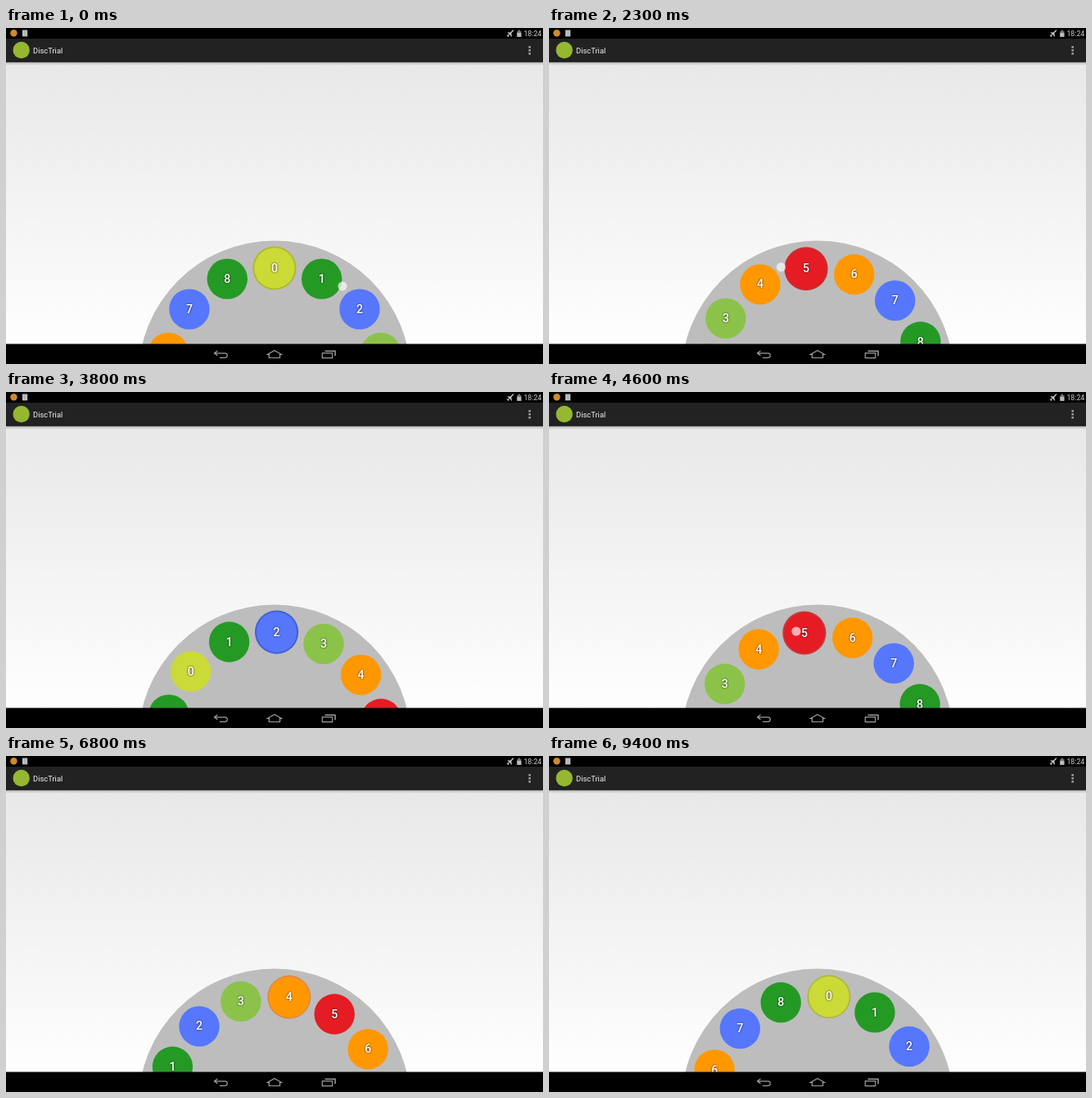
These frames come from a looping animation (656 by 410 pixels, 9500 ms). An HTML page:

```html
<!DOCTYPE html>
<html lang="en">
<head>
<meta charset="utf-8">
<title>Wheel</title>
<style>
  html, body { margin: 0; width: 100%; height: 100%; overflow: hidden; background: #000; }
  svg { display: block; width: 656px; height: 410px; font-family: Roboto, sans-serif; }
  .label { fill: #fff; font-size: 14.2px; font-weight: 500; text-anchor: middle;
           filter: drop-shadow(.6px .8px .9px rgba(0, 0, 0, .85)); }
</style>
</head>
<body>
<svg viewBox="0 0 656 410">
  <defs>
    <linearGradient id="page" x1="0" y1="0" x2="0" y2="1">
      <stop offset="0" stop-color="#e8e8e8"/>
      <stop offset="1" stop-color="#fefefe"/>
    </linearGradient>
    <linearGradient id="shade" x1="0" y1="0" x2="0" y2="1">
      <stop offset="0" stop-color="#000" stop-opacity=".25"/>
      <stop offset="1" stop-color="#000" stop-opacity="0"/>
    </linearGradient>
  </defs>
  <rect y="41" width="656" height="345" fill="url(#page)"/>
  <rect y="41.5" width="656" height="4" fill="url(#shade)"/>

  <circle cx="328" cy="426" r="166.5" fill="#bdbdbd"/>
  <g id="items"></g>
  <circle id="finger" r="5.6" fill="#fff" fill-opacity=".65"/>

  <!-- status and action bars -->
  <rect width="656" height="13" fill="#000"/>
  <rect y="13" width="656" height="28.5" fill="#222"/>
  <rect y="40.5" width="656" height="1" fill="#111"/>
  <circle cx="9.5" cy="6.2" r="4.2" fill="#d08a30"/>
  <rect x="20" y="2.5" width="6.2" height="7.8" fill="#c4c4c4"/>
  <path d="M21.2 4.5h3.8M21.2 6.4h3.8M21.2 8.3h3.8" stroke="#999" stroke-width=".6"/>
  <path d="M613 5.2l3 .4 3-3q1.6-.8 1 .8l-2.700 2.900 .6 4-.8.5-1.500-3-1.500 1.500v1.500l-.7.4-.6-1.500-1.400-.7.5-.6 1.500.1 1.300-1.500-2.300-1.100z" fill="#ccc"/>
  <path d="M624.300 4h1.400V2.500h2.300V4h1.400v6.800h-5.100z" fill="#777"/>
  <path d="M624.300 6h5.100v4.800h-5.100z" fill="#bbb"/>
  <text x="632.400" y="9.900" font-size="8.800" fill="#cfcfcf">18:24</text>
  <circle cx="18.700" cy="27" r="10.200" fill="#95b830"/>
  <text x="33" y="30.700" font-size="9.400" fill="#f3f3f3">DiscTrial</text>
  <path d="M639.700 22v2.600m0 1.400v2.600m0 1.400v2.600" stroke="#9a9a9a" stroke-width="2.600"/>

  <!-- navigation bar -->
  <rect y="385.500" width="656" height="24.500" fill="#000"/>
  <g fill="none" stroke="#9c9c9c" stroke-width="1.200">
    <path d="M258.500 393.800l-4 3 4 3M255 396.800h12.500q2.800 0 2.800 2.800t-2.800 2.800h-6.500"/>
    <path d="M319.600 398.300l8.400-4.800 8.400 4.800h-1.800v4.200h-13.200v-4.200z"/>
    <path d="M386.300 396.700h12.400v6h-12.400z"/>
    <path d="M389.500 394.300h12.600v6" stroke-width="1.500"/>
  </g>
</svg>
<script>
const LOOP = 9500, STEP = 100;
const CX = 328, CY = 426, ORBIT = 133, SLOT = 360 / 14;

// fill and selection ring of each label
const COLORS = [
  ["#cbda37", "#adb92b"], ["#249a24", "#0d7e10"], ["#5677fc", "#3f5fd6"],
  ["#8bc34a", "#689f38"], ["#ff9800", "#f07818"], ["#e51c23", "#c91519"],
  ["#ff9800", "#f07818"], ["#5677fc", "#3f5fd6"], ["#249a24", "#0d7e10"]
];

// time in ms, item at the top, items per second
const SPIN = [
  [0, 0, 0], [1400, 2.985, 0], [3100, 8.56, 3.5], [4600, 14.27, 5],
  [6800, 30.7, 6.7], [8000, 38.11, 5.6], [9400, 44.765, 3.9], [9500, 45.15, 3.8]
];

// swipes: item at the top, finger angle and radius, angle of touch-down
const SWIPES = [
  [0, 36.8, 138.6, 37], [2.985, 39.5, 141.4, 40],
  [8.56, -2.6, 132.1, 38], [14.27, -11, 136.5, 38]
];

function topItem(t) {
  let k = 0;
  while (k < SPIN.length - 2 && t >= SPIN[k + 1][0]) k++;
  const [t0, p0, v0] = SPIN[k], [t1, p1, v1] = SPIN[k + 1];
  const u = (t - t0) / (t1 - t0), s = (t1 - t0) / 1000, w = 1 - u;
  return w * w * ((1 + 2 * u) * p0 + u * s * v0) +
         u * u * ((3 - 2 * u) * p1 - w * s * v1);
}

function polar(deg, r) {
  const a = deg * Math.PI / 180;
  return [CX + r * Math.sin(a), CY - r * Math.cos(a)];
}

function add(parent, name, attrs) {
  const el = document.createElementNS("http://www.w3.org/2000/svg", name);
  return set(parent.appendChild(el), attrs);
}

function set(el, attrs) {
  for (const key in attrs) el.setAttribute(key, attrs[key]);
  return el;
}

const layer = document.getElementById("items");
const finger = document.getElementById("finger");
const slots = [-4, -3, -2, -1, 0, 1, 2, 3, 4].map(offset => {
  const g = add(layer, "g", {});
  return {
    offset, g,
    ring: add(g, "circle", { r: 26.6 }),
    disc: add(g, "circle", { r: 24.7 }),
    label: add(g, "text", { class: "label", y: 4.6 })
  };
});

function draw(t) {
  const p = topItem(t), top = Math.round(p);

  for (const { offset, g, ring, disc, label } of slots) {
    const i = top + offset, n = (i % 9 + 9) % 9;
    const [x, y] = polar((i - p) * SLOT, ORBIT);
    set(g, { transform: `translate(${x} ${y})` });
    const near = Math.min(1, Math.abs(i - p) * 2);
    set(ring, { fill: COLORS[n][1], opacity: offset ? 0 : 1 - near ** 2.5 });
    set(disc, { fill: COLORS[n][0] });
    label.textContent = n;
  }

  let shown = false;
  for (const [q, angle, r, start] of SWIPES) {
    const a = angle - (p - q) * SLOT;
    if (a > start || a < -32) continue;
    const [cx, cy] = polar(a, r);
    set(finger, { cx, cy });
    shown = true;
  }
  set(finger, { visibility: shown ? "visible" : "hidden" });
}

const began = performance.now();
function tick() {
  const t = (performance.now() - began) % LOOP;
  draw(Math.floor(t / STEP) * STEP);
  requestAnimationFrame(tick);
}
tick();
</script>
</body>
</html>
```
